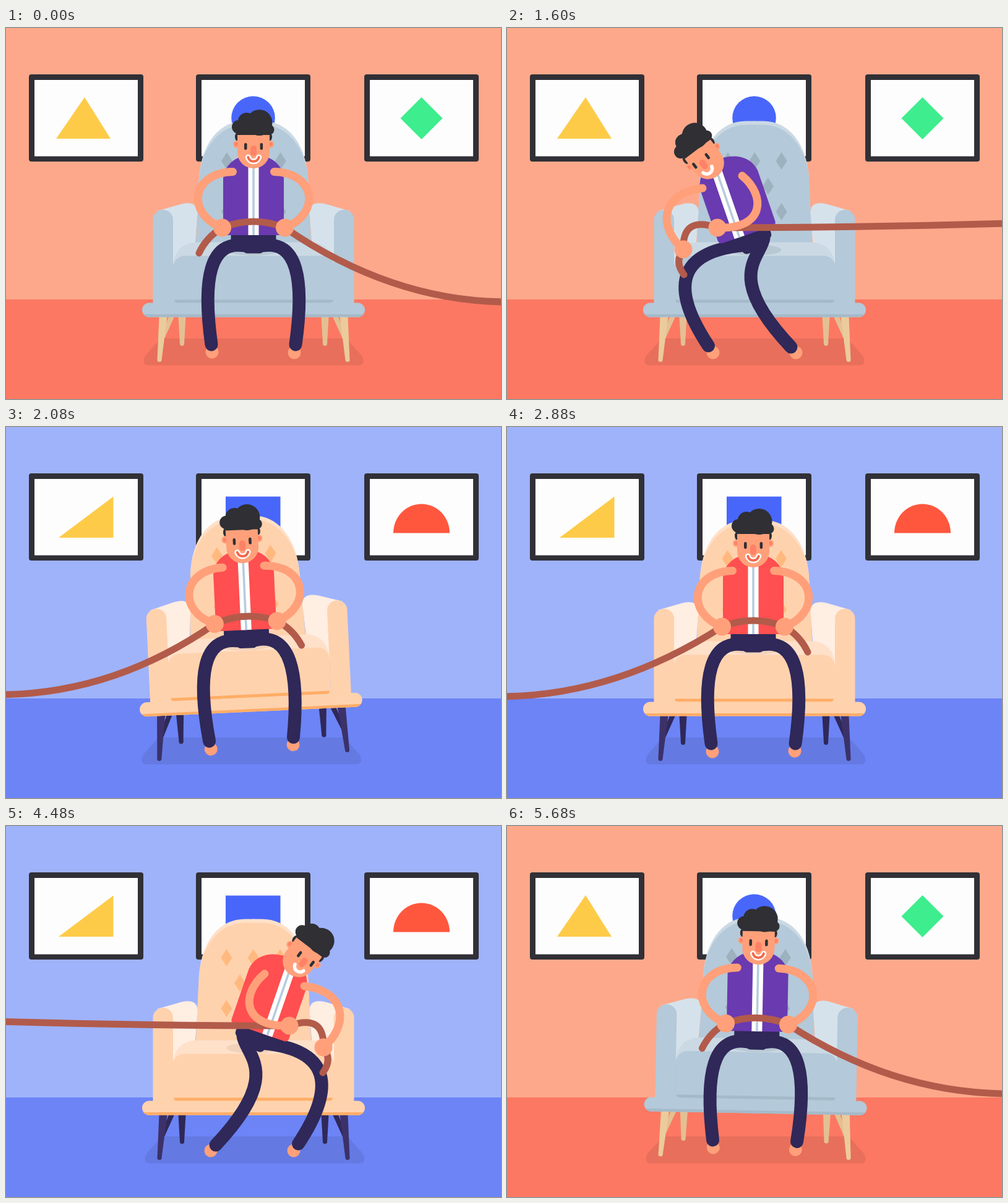
Write an HTML page with a canvas that moves like this. It is 800x600 px and loops after 5.76 s.

```html
<!DOCTYPE html>
<html>
<head>
<meta charset="utf-8">
<title>Tug of war</title>
<style>
  html, body { margin: 0; width: 100%; height: 100%; overflow: hidden; }
  canvas { display: block; width: 100vw; height: 100vh; }
</style>
</head>
<body>
<canvas id="stage" width="800" height="600"></canvas>
<script>
const ctx = document.getElementById('stage').getContext('2d');
const LOOP = 5760, HALF = LOOP / 2, CUT = 1840, STEP = 80, PULL_TIME = 1600;
const SKIN = '#ffa07a', BLUSH = '#ff8266', DARK = '#2f2f34', PANTS = '#2f2858', ROPE = '#b25b4b';
const CENTER = 400, HINGE = { x: 552, y: 540 };

const RED_ROOM = {
  dir: 1, sag: 10, shadowX: 400, wall: '#fda88b', floor: '#fc7862', shadow: '#e86f5b',
  chair: '#b4c9d9', rim: '#cbd9e4', arm: '#d6e2eb', dent: '#b7c8d4', button: '#9db1bf',
  edge: '#a5bac9', leg: '#ebcb9c', backLeg: '#e3c093', jacket: '#6a3ab0'
};
const BLUE_ROOM = {
  dir: -1, sag: 3, shadowX: 402, wall: '#9fb3fb', floor: '#6c84f6', shadow: '#647ae2',
  chair: '#ffd2ae', rim: '#ffe0c9', arm: '#ffeee2', dent: '#f2d2b9', button: '#ffb97f',
  edge: '#ffad66', leg: '#3c3169', backLeg: '#2f2858', jacket: '#ff4f50'
};

const rad = deg => deg * Math.PI / 180;
const lerp = (a, b, p) => a + (b - a) * p;
const mix = (from, to, p) => from.map((v, i) => lerp(v, to[i], p));
const flip = pts => pts.map((v, i) => i % 2 ? v : 2 * CENTER - v);

function fill(color, build) {
  ctx.fillStyle = color;
  ctx.beginPath();
  build();
  ctx.fill();
}
const box = (color, x, y, w, h, r = 0) => fill(color, () => ctx.roundRect(x, y, w, h, r));
const oval = (color, x, y, rx, ry = rx) => fill(color, () => ctx.ellipse(x, y, rx, ry, 0, 0, 7));
const poly = (color, ...pts) => fill(color, () => {
  for (let i = 0; i < pts.length; i += 2) ctx.lineTo(pts[i], pts[i + 1]);
});
const diamond = (color, x, y, w, h) => poly(color, x, y - h, x + w, y, x, y + h, x - w, y);
const shape = (color, d) => { ctx.fillStyle = color; ctx.fill(new Path2D(d)); };

function stroke(color, width, build) {
  ctx.strokeStyle = color;
  ctx.lineWidth = width;
  ctx.lineCap = ctx.lineJoin = 'round';
  ctx.beginPath();
  build();
  ctx.stroke();
}
const limb = (color, width, [x, y, ...curve]) => stroke(color, width, () => {
  ctx.moveTo(x, y);
  ctx.bezierCurveTo(...curve);
});

function scoped(draw) {
  ctx.save();
  draw();
  ctx.restore();
}
const mirrored = (axis, draw) => scoped(() => {
  ctx.translate(axis * 2, 0);
  ctx.scale(-1, 1);
  draw();
});
const bothSides = draw => { draw(); mirrored(CENTER, draw); };

function tip(angle) {
  ctx.translate(HINGE.x, HINGE.y);
  ctx.rotate(angle);
  ctx.translate(-HINGE.x, -HINGE.y);
}
function untip([x, y], angle) {
  const dx = x - HINGE.x, dy = y - HINGE.y, c = Math.cos(angle), s = Math.sin(angle);
  return [HINGE.x + dx * c + dy * s, HINGE.y - dx * s + dy * c];
}

function drawRoom(room, tilt) {
  box(room.wall, 0, 0, 800, 600);
  box(room.floor, 0, 439, 800, 161);
  for (const x of [37, 307, 579]) {
    box('#303036', x, 75, 185, 141, 4);
    box('#fdfdfd', x + 9, 84, 167, 123.5);
  }
  if (room.dir > 0) {
    poly('#fecb49', 127, 112, 169, 179, 81, 179);
    oval('#4867fa', 399.5, 145.5, 35.3);
    diamond('#3eed8d', 671.5, 146, 34, 34);
  } else {
    poly('#fecb49', 173.5, 112.5, 173.5, 179, 85, 179);
    box('#4867fa', 355, 112.5, 88.5, 88);
    fill('#ff573e', () => ctx.ellipse(671.5, 171.5, 45.5, 47, 0, Math.PI, 0));
  }
  scoped(() => {
    ctx.translate(room.shadowX + room.dir * 2 * tilt, 0);
    shape(room.shadow, 'M-150 502H150L175 530Q182 545.5 169 545.5H-169Q-182 545.5 -175 530Z');
  });
}

function drawChairBack(color, inset) {
  const top = 150.5 + inset;
  const half = () => {
    ctx.moveTo(401, 348);
    ctx.lineTo(307, 348);
    ctx.lineTo(312, 240 + inset / 3);
    ctx.bezierCurveTo(317, 184 + inset, 346 + inset / 3, top, 386, top);
    ctx.lineTo(401, top);
  };
  bothSides(() => fill(color, half));
}

function drawButtons(room) {
  const y = room.dir > 0 ? 215 : 213;
  for (let row = 0; row < 3; row++)
    for (let col = 0; col < 3 - row % 2; col++)
      diamond(room.button, 357 + (col + row % 2 / 2) * 43.3, y + row * 41, 9, 14);
}

function drawChair(room, angle) {
  const post = (color, top, width, foot, length) => {
    poly(color, top, 467, top + width, 467, foot + 3.5, 467 + length, foot - 3.5, 467 + length);
    oval(color, foot, 467 + length, 3.5, 3);
  };
  scoped(() => {
    tip(angle);
    bothSides(() => {
      post(room.backLeg, 263, 9, 254, 32);
      post(room.backLeg, 278.5, 12, 284.5, 44);
      post(room.leg, 247.5, 13, 248, 70);
    });
    drawChairBack(room.rim, 0);
    drawChairBack(room.chair, 6);
    drawButtons(room);
    bothSides(() => shape(room.arm, 'M244 296L284 284.5Q309 279 309.5 298L306 347L296 390H262V300Z'));
    shape(room.rim, 'M270 385Q272 351 304 346.500H496Q528 351 530 385Z');
    oval(room.dent, CENTER, 359, 43.5, 9);
    box(room.chair, 270, 368.5, 261, 77, [19, 19, 0, 0]);
    box(room.edge, 272, 439.5, 257, 5, [0, 0, 5, 5]);
    bothSides(() => box(room.chair, 237.5, 294, 32.5, 152, [16, 16, 0, 0]));
    fill(room.chair, () => ctx.roundRect(220, 444.5, 360, 23, 11.5));
    ctx.clip();
    box(room.edge, 220, 463, 360, 5);
  });
}

function drawLegs(p) {
  const rest = [385, 352, 330, 343, 317, 405, 332, 512];
  const front = mix(rest, [405, 350, 260, 355, 270, 430, 325.5, 514], p);
  const back = mix(flip(rest), [415, 340, 410, 372, 350, 400, 459, 516], p);
  oval(SKIN, 333, 524 + p, 10.5);
  oval(SKIN, 466 + p, 525, 10.5);
  limb(PANTS, 21, back);
  limb(PANTS, 21, front);
}

function drawTorso(room, p) {
  scoped(() => {
    ctx.translate(CENTER - 11 * p, 335 - p);
    ctx.rotate(rad(-19 * p));
    box(PANTS, -36.5, -4, 73, 22, 8 * p);
    box(PANTS, -17, 0, 34, 29.5, 7);
    box(room.jacket, -49, -93, 98, 93, [0, 0, 6 * p, 6 * p]);
    fill(room.jacket, () => {
      ctx.moveTo(-49, -92);
      ctx.bezierCurveTo(-44, -143, 44, -143, 49, -92);
    });
    const zip = -14 * p;
    box('#fff', zip - 8.5, -122, 17, 122);
    box('#b7ccdd', zip - 1.8, -122, 3.6, 122);
  });
}

function drawHead(room, p) {
  scoped(() => {
    ctx.translate(lerp(CENTER, 317, p), lerp(188, 208, p));
    // The face keeps its own left and right in both rooms.
    ctx.scale(room.dir, 1);
    ctx.rotate(rad(-37 * p * room.dir));
    for (const side of [-1, 1]) {
      oval(DARK, side * 26.5, -12, 3.5, 6.5);
      oval(SKIN, side * 27, 0, 6);
      oval(BLUSH, side * 27.5, 0, 3.2);
    }
    box(SKIN, -26, -18, 52, 57, [0, 0, 26, 26]);
    oval(DARK, -24, -28, 11);
    oval(DARK, -11, -37, 14);
    oval(DARK, 9.5, -35, 21);
    oval(DARK, 25, -23.5, 8.5);
    box(DARK, -26, -38, 52, 23);

    ctx.translate(-7 * p * room.dir, 0);
    for (const side of [-1, 1]) box(DARK, side * 12.8 - 2.2, -2, 4.5, 11, 2.2);
    box(BLUSH, -5, 2, 10, 17, 5);
    const smile = [-8.7, 21, -6, 30, 6, 30, 8.7, 21];
    limb('#fff', lerp(9, 5.5, p), smile);
    if (p < 0.95) limb('#f2694c', 4 * (1 - p), smile);
  });
}

function drawRope(lead, trail, p, angle, sag) {
  const low = 433 + sag;
  const knots = [
    mix([324, 338], [270, 378], p), lead,
    mix([400, 303], [283, 303], p), trail,
    untip(mix([625, low], [560, 323], p), angle), untip([812, lerp(low, 316, p)], angle)
  ];
  stroke(ROPE, 11, () => {
    ctx.moveTo(...mix([312, 364], [286, 399], p));
    for (let i = 0; i < knots.length; i += 2) ctx.quadraticCurveTo(...knots[i], ...knots[i + 1]);
  });
}

function drawPlayer(room, p, angle, sag) {
  const rest = [366.5, 232.5, 300, 234, 290, 300, 349.5, 323];
  const arms = [
    mix(rest, [316, 259, 245, 267, 245, 325, 285, 358], p),
    mix(flip(rest), [380, 239, 418, 270, 418, 326, 340, 323], p)
  ];
  const [lead, trail] = arms.map(arm => arm.slice(-2));
  scoped(() => {
    tip(angle);
    drawLegs(p);
    drawTorso(room, p);
    drawHead(room, p);
    drawRope(lead, trail, p, angle, sag);
    for (const arm of arms) {
      limb(SKIN, 13, arm);
      oval(SKIN, ...arm.slice(-2), 14.5);
    }
  });
}

function render(time) {
  const t = Math.floor(time % LOOP / STEP) * STEP;
  const room = t >= CUT && t < CUT + HALF ? BLUE_ROOM : RED_ROOM;
  const local = t % HALF;
  const yanked = local >= CUT;

  // The yanked chair hops up and falls back; then its owner pulls in turn.
  const hop = (local - CUT) / (HALF - CUT);
  const tilt = yanked ? 15 * hop * (1 - hop) : 0;
  const k = yanked ? 0 : Math.min(1, local / PULL_TIME);
  const pull = k * k * (3 - 2 * k);

  drawRoom(room, tilt);
  const place = (axis, draw) => room.dir > 0 ? draw() : mirrored(axis, draw);
  place(CENTER, () => drawChair(room, rad(tilt)));
  place(CENTER - 1, () => drawPlayer(room, pull, rad(tilt), yanked ? 0 : room.sag));
}

const start = performance.now();
function tick() {
  render(performance.now() - start);
  requestAnimationFrame(tick);
}
tick();
</script>
</body>
</html>
```
